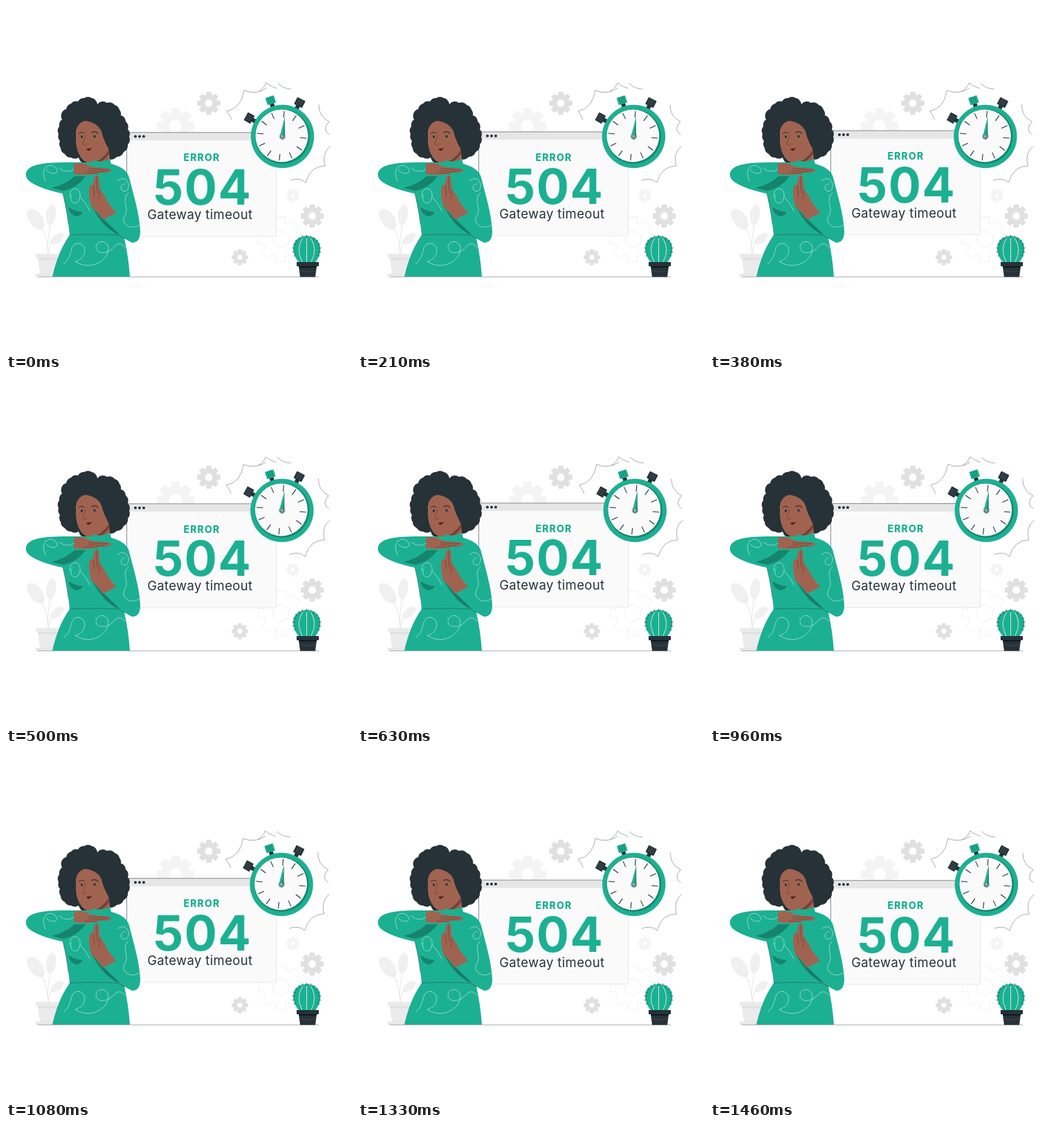
These frames come from a looping animation (500 px wide and 500 px high, 1500 ms). An HTML page:

```html
<!DOCTYPE html>
<html lang="en">
<head>
<meta charset="utf-8">
<title>504 Gateway timeout</title>
<style>
html, body { margin: 0; height: 100%; overflow: hidden; background: #fff; }
svg { display: block; width: 100%; height: 100%; }
text { font-family: Inter, "Open Sans", sans-serif; text-anchor: middle; }
.green { fill: #1cb092; }
.deep { fill: #15846d; }
.dark { fill: #263238; }
.skin { fill: #a06350; }
.line { fill: none; stroke: #263238; stroke-width: .5; stroke-linecap: round; stroke-linejoin: round; }
.thread { fill: none; stroke: #d5f1ea; stroke-width: .6; stroke-linecap: round; }
.crease { fill: none; stroke: #60352b; stroke-width: .6; stroke-linecap: round; }
</style>
</head>
<body>
<svg viewBox="0 0 500 500">
  <g id="gears"></g>

  <g id="plant" fill="#f0f0f0">
    <ellipse cx="43" cy="308" rx="9.500" ry="17" transform="rotate(-38 43 308)"/>
    <ellipse cx="65" cy="302" rx="7" ry="15" transform="rotate(8 65 302)"/>
    <ellipse cx="74" cy="336" rx="6" ry="11.500" transform="rotate(52 74 336)"/>
    <path d="M50 318Q60 332 61 360M64 316Q59 340 61 360M68 341Q61 347 61 360" fill="none" stroke="#e6e6e6"/>
    <path d="M43 358H86V364H82L80 387H49L46 364H43Z" fill="#ebebeb"/>
    <path d="M46 364H82L81.500 367H46.500Z" fill="#e0e0e0"/>
    <rect x="43" y="387" width="42" height="4" fill="#e6e6e6"/>
  </g>

  <path class="line" d="M46 391.500H452" opacity=".75"/>

  <g id="window">
    <rect x="174.500" y="182.800" width="216" height="150.200" fill="#fafafa" stroke="#e0e0e0" stroke-width=".7"/>
    <rect x="174.500" y="182.800" width="216" height="11.400" fill="#e6e6e6"/>
    <path class="line" d="M174.500 333V182.800H390.500"/>
    <g class="dark"><circle cx="187" cy="188.600" r="2"/><circle cx="193" cy="188.600" r="2"/><circle cx="199" cy="188.600" r="2"/></g>
    <text class="green" x="283" y="224.500" font-size="14" font-weight="800" letter-spacing="1.2">ERROR</text>
    <text class="green" x="284" y="287" font-size="70" font-weight="700" letter-spacing="1.5">504</text>
    <text class="dark" x="280.300" y="308.300" font-size="18.500" font-weight="400" letter-spacing=".35">Gateway timeout</text>
  </g>

  <g id="watch">
    <path class="line" opacity=".8" d="M326 164Q323 156 319 152Q340 148 344 122Q361 129 376 119M366 123Q373 119 376 111Q381 116 391 119M393 112Q401 120 412 120M452 143Q452 160 467 167Q456 179 467 186M468 203Q456 213 461 231Q440 231 433 255Q424 247 411 252"/>
    <g transform="translate(399.500 188.500)">
      <g id="buttons"></g>
      <circle class="green" r="45.700"/>
      <circle class="deep" r="39.500"/>
      <circle cx="-1" cy="-1" r="38" fill="#fafafa"/>
      <g id="ticks" class="line" style="stroke-width:1.100"></g>
      <circle r="5" fill="#c7c7c7"/>
      <circle class="dark" r="3.300"/>
      <path class="green" d="M3.500 -29L-3.500 -1L0 5Z"/>
      <path class="deep" d="M3.500 -29L3.500 0L0 5Z"/>
      <circle r="2.200" fill="#a6a6a6"/>
    </g>
  </g>

  <g id="woman">
    <path id="hair" class="dark"/>
    <path class="skin" d="M101 182C102 173 107 168 114 166C125 167 134 172 138 181C140 190 143 197 148 206L151 226V240H124V227C110 228 102 212 101 196Z"/>
    <path d="M124 227Q139 223 148 209L148.500 214Q140 227 125 230Z" fill="#713f32"/>
    <path class="line" d="M106 184Q109 181 113 184M124 183Q128 180 133 184" style="stroke-width:1.200"/>
    <path class="crease" d="M115 187Q112 195 111 200Q114 203 117 200"/>
    <ellipse class="dark" cx="109.500" cy="189" rx="1.500" ry="2"/>
    <ellipse class="dark" cx="128" cy="188.500" rx="1.500" ry="2"/>
    <path d="M116 207Q119 205 120 206L124 205Q122 210 118 209Z" fill="#54251f"/>

    <path class="green" d="M125 223Q139 227 150 221L152 228C163 231 175 236 178 248C184 272 193 300 194 325C194 337 190 342 182 342L171 336Q177 362 179 391H67Q75 355 92 331Q89 299 82 271C62 267 48 262 38 256C25 249 26 236 40 231C57 225 81 226 107 226H125Z"/>
    <path class="deep" d="M66 263Q86 258 99 246H115Q102 264 82 267Z"/>
    <path class="deep" d="M90 291Q100 297 111 298Q107 304 101 304Q92 301 90 291Z"/>
    <path class="deep" d="M125 291L141 308L165 331Q140 322 125 291Z"/>
    <path class="line" d="M92 331Q128 329 162 331L171 336M82 271Q87 289 90 315M162 331Q149 321 140 309" style="stroke-width:.4"/>
    <path class="thread" d="M57 253C48 233 63 225 72 234C80 243 62 245 59 237M77 234Q87 243 98 236
      M92 275C93 258 109 262 107 276C104 290 91 286 94 273M107 276Q116 285 121 296
      M161 253C172 242 183 259 174 267C164 271 164 256 172 257M177 270C165 282 180 291 171 304C166 315 181 325 193 316
      M84 372C98 362 90 344 104 343C118 344 117 365 100 369C122 384 148 368 148 350C146 337 130 338 130 349C132 361 150 357 157 347Q165 339 172 349"/>
    <path class="skin" d="M128 247Q131 242 134 247L136 266Q144 274 146 282L159 299L140 309Q133 297 124 291Q120 280 120 267Q120 257 125 259Z"/>
    <path class="crease" d="M131 247L132 270M126 260L128 275M136 266L134 278"/>
    <path class="skin" d="M98 228Q113 225 122 232L149 235Q154 237 150 240L135 241Q120 246 98 243Z"/>
    <path class="crease" d="M120 235L148 237M119 238L144 240M114 241L133 242"/>
  </g>

  <g id="cactus">
    <path class="green" d="M424 371C411 358 410 334 434 332C458 333 459 358 446 371Z"/>
    <path class="thread" d="M431 332Q417 350 428 370M438 332Q452 350 441 370M434.500 334V370" style="stroke-width:.9"/>
    <g id="spines" class="line" style="stroke-width:.6"></g>
    <path class="dark" d="M420 370H452V376H449L447 391.500H425L423 376H420Z"/>
    <path d="M423 376H449L448.700 378H423.300Z" fill="#111a1e"/>
    <path d="M425 384l3 -2l4 3l4 -3l4 3l4 -3l3 2" fill="none" stroke="#455a64" stroke-width=".7"/>
  </g>
</svg>
<script>
const $ = id => document.getElementById(id);
const TAU = Math.PI * 2;
const polar = (x, y, r, a) => `${(x + r * Math.cos(a)).toFixed(2)} ${(y + r * Math.sin(a)).toFixed(2)}`;

function gear(x, y, r, style, hole = 0.36) {
  let d = '';
  for (let i = 0; i < 8; i++) {
    const a = (i - 2) * TAU / 8;
    [[-.27, .76], [-.2, 1], [.2, 1], [.27, .76]].forEach(([da, k], j) => {
      d += `${i || j ? 'L' : 'M'}${polar(x, y, r * k, a + da)}`;
    });
  }
  const h = r * hole;
  d += `ZM${x - h} ${y}a${h} ${h} 0 1 0 ${2 * h} 0a${h} ${h} 0 1 0 ${-2 * h} 0Z`;
  return `<path d="${d}" fill-rule="evenodd" stroke-linejoin="round" ${style}/>`;
}

const grey = 'fill="#e0e0e0" stroke="#e0e0e0"';
const pale = 'fill="#f4f4f4" stroke="#f4f4f4"';
$('gears').innerHTML =
  gear(245, 174, 27, pale) + gear(293, 140.5, 16.5, grey) +
  gear(414.5, 274, 9.5, pale) + gear(442.5, 303.5, 16.5, grey) +
  gear(338, 363, 11.5, grey) +
  gear(397, 337, 33, 'fill="none" stroke="#dedede" stroke-width=".6" stroke-dasharray="3 1"');

// Curly outline: one small arc between neighbouring points
const curls = [[104,138],[113,133],[124,133],[132,142],[146,140],[157,143],[164,150],[166,158],[173,167],
  [176,178],[178,189],[176,200],[170,211],[160,218],[148,221],[130,213],[105,219],[94,219],[85,214],[79,205],
  [78,195],[76,185],[77,174],[81,164],[80,156],[87,149],[94,141]];
$('hair').setAttribute('d', 'M' + curls.join('A10 10 0 0 1 ') + 'A10 10 0 0 1 ' + curls[0] + 'Z');

const button = (angle, color, ridge) => `<g transform="rotate(${angle})">
  <rect class="dark" x="-3" y="-51" width="6" height="8"/>
  <rect class="${color}" x="-6.5" y="-60.5" width="13" height="11" rx="1"/>
  <path d="M-3 -60V-51M0 -60V-51M3 -60V-51" stroke="${ridge}" stroke-width=".9"/></g>`;
$('buttons').innerHTML = button(-61, 'dark', '#455a64') + button(-18, 'green', '#147c67') + button(27, 'dark', '#455a64');

let ticks = '';
for (let i = 0; i < 12; i++) {
  const a = i * TAU / 12 + .1;
  ticks += `M${polar(-1, -1, 35.5, a)}L${polar(-1, -1, 27, a)}`;
}
$('ticks').innerHTML = `<path d="${ticks}"/>`;

let spines = '';
for (let i = 0; i < 15; i++) {
  const a = Math.PI * (.85 + i * 1.3 / 14);
  spines += `M${polar(434.5, 352, 17.5, a)}L${polar(434.5, 352, 21, a)}`;
}
$('spines').innerHTML = `<path d="${spines}"/>`;

function draw() {
  const a = TAU * (performance.now() % 1500) / 1500;
  const lift = -2.6 * (1 - Math.cos(a));
  const sway = 1.15 * Math.cos(2 * a) - .7 * Math.cos(a) - .45;
  $('window').setAttribute('transform', `translate(0 ${lift})`);
  $('watch').setAttribute('transform', `translate(${sway} 0)`);
  requestAnimationFrame(draw);
}
draw();
</script>
</body>
</html>
```
